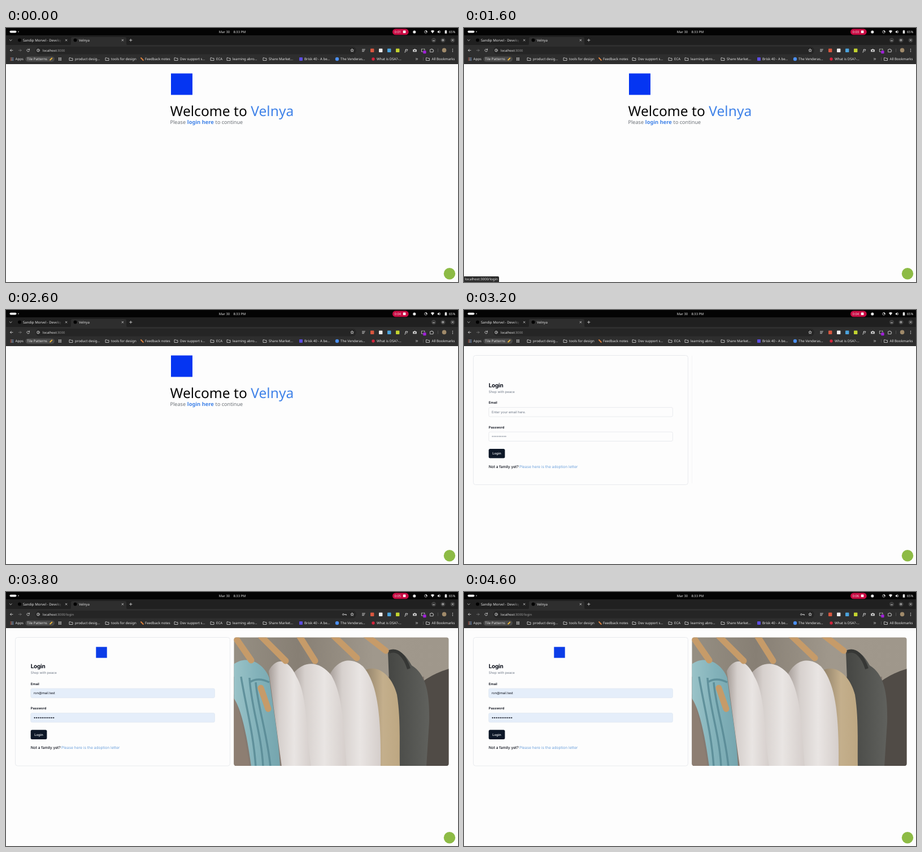
An HTML page that plays this animation: 800x450 px, repeating every 5.5 s.

```html
<!DOCTYPE html>
<html lang="en">
<head>
<meta charset="utf-8">
<title>Login</title>
<style>
  html, body { margin: 0; width: 100%; height: 100%; overflow: hidden; background: #fdfdfd; }
  svg { display: block; width: 100vw; height: 100vh; }
  text { white-space: pre; text-rendering: geometricPrecision; }
  .ui { font: 6.1px "Noto Sans", sans-serif; fill: #e6e6e6; }
  .line { fill: none; stroke: #dcdcdc; stroke-width: .8; stroke-linecap: round; stroke-linejoin: round; }
  .welcome { font: 24.6px "Noto Sans", sans-serif; fill: #050505; }
  .hint { font: 300 9.1px "Noto Sans", sans-serif; fill: #6d7278; }
  .blue { fill: #3f82e8; }
  .form { font: 5.83px Inter, sans-serif; fill: #0b0f1a; }
  .label { font-weight: 600; }
  .grey { fill: #6c7685; }
</style>
</head>
<body>
<svg viewBox="0 0 800 450">
  <defs>
    <linearGradient id="wall">
      <stop offset="0" stop-color="#968f83"/>
      <stop offset=".3" stop-color="#877f74"/>
      <stop offset=".65" stop-color="#a0988c"/>
      <stop offset="1" stop-color="#9f978b"/>
    </linearGradient>
    <linearGradient id="cloth">
      <stop offset="0" stop-color="#a59c97"/>
      <stop offset=".25" stop-color="#d6d0cd"/>
      <stop offset=".6" stop-color="#e9e5e3"/>
      <stop offset="1" stop-color="#d5cecb"/>
    </linearGradient>
    <linearGradient id="beige">
      <stop offset="0" stop-color="#94846c"/>
      <stop offset=".5" stop-color="#c4af8c"/>
      <stop offset="1" stop-color="#bda782"/>
    </linearGradient>
    <linearGradient id="denim">
      <stop offset="0" stop-color="#454643"/>
      <stop offset="1" stop-color="#60615d"/>
    </linearGradient>
    <linearGradient id="teal">
      <stop offset="0" stop-color="#9ac3c8"/>
      <stop offset=".5" stop-color="#83b2ba"/>
      <stop offset="1" stop-color="#75a5ae"/>
    </linearGradient>
    <linearGradient id="fade">
      <stop offset="0" stop-color="#202020" stop-opacity="0"/>
      <stop offset="1" stop-color="#202020"/>
    </linearGradient>
    <clipPath id="frame"><rect x="403.5" y="80.5" width="380" height="227.5" rx="4"/></clipPath>
    <path id="folder" class="line" d="M.4 -2.2h2.1l.8 .9h2.7v3.8h-5.6z"/>
  </defs>

  <rect width="800" height="450" fill="#fdfdfd"/>

  <g id="home">
    <rect x="292" y="80.5" width="38" height="38" fill="#0535f2"/>
    <text class="welcome" x="290.5" y="156">Welcome to <tspan class="blue">Velnya</tspan></text>
    <g class="hint">
      <text x="290.5" y="170.3">Please</text>
      <text x="320.8" y="170.3" class="blue" font-weight="700" font-size="9.3">login here</text>
      <text x="370.6" y="170.3">to continue</text>
    </g>
  </g>

  <g id="login" class="form">
    <rect id="card" x="16.5" y="80.5" width="380" height="227.5" rx="4" fill="none" stroke="#e4e6ea" stroke-width=".8"/>
    <g id="fields">
      <text x="43.7" y="135.2" font-size="10" font-weight="700" letter-spacing="-.25">Login</text>
      <text class="grey" x="43.7" y="145.4">Shop with peace</text>
      <text class="label" x="43.7" y="164.6">Email</text>
      <text class="label" x="43.7" y="208.2">Password</text>
      <g id="boxes" stroke-width=".8">
        <rect x="43.8" y="171" width="325.6" height="16.4" rx="2.4"/>
        <rect x="43.8" y="214.4" width="325.6" height="16.4" rx="2.4"/>
      </g>
      <rect x="43.7" y="244.3" width="28.7" height="16.6" rx="2.5" fill="#0d1727"/>
      <text x="50.3" y="254.7" font-weight="500" fill="#f8fafc">Login</text>
      <text x="43.7" y="278.2" font-size="6.67" font-weight="500">Not a family yet?</text>
      <text x="98" y="278.2" font-size="6.67" fill="#6da1dc">Please here is the adoption letter</text>
      <g id="empty" class="grey">
        <text x="49" y="181.3">Enter your email here.</text>
        <text x="49" y="225.6">*********</text>
      </g>
    </g>
    <line id="edge" x1="403.5" y1="81" x2="403.5" y2="307" stroke="#f1f2f4" stroke-width=".8"/>
    <g id="filled">
      <rect x="159.3" y="97.3" width="19.4" height="19.4" fill="#0c3de8"/>
      <text x="49" y="181.3">ron@mail.test</text>
      <g id="dots"></g>
      <g clip-path="url(#frame)">
        <rect x="403" y="80" width="381" height="229" fill="url(#wall)"/>
        <path d="M403 150H740V309H403z" fill="#857a71"/>
        <path d="M726 168Q750 146 784 136V309H726z" fill="#504b46"/>
        <path d="M676 106C692 98 706 108 718 130 744 146 750 180 749 230L744 309H684z" fill="url(#denim)"/>
        <path d="M678 106C694 100 706 114 713 136" fill="none" stroke="#363735" stroke-width="6"/>
        <path d="M637 138C660 128 684 150 692 182 699 226 696 270 697 309H652z" fill="url(#beige)"/>
        <path d="M572 148C588 116 614 116 632 132 656 160 664 210 663 309H602z" fill="url(#cloth)"/>
        <path d="M504 150C526 118 556 122 576 148 598 186 598 250 603 309H532z" fill="url(#cloth)"/>
        <path d="M465 140C478 114 500 118 514 150 534 184 530 240 540 309H488z" fill="url(#cloth)"/>
        <path d="M403 180Q418 220 431 309H403z" fill="#8d7e72"/>
        <path d="M403 128C424 112 454 122 466 152 472 204 482 250 485 309H434C426 250 416 206 403 188z" fill="url(#teal)"/>
        <g fill="none" stroke="#568893" stroke-width="3.5" opacity=".8">
          <path d="M431 152C434 205 452 250 455 309M442 160C446 205 462 250 468 309M416 150C424 200 438 250 442 309M431 160Q446 150 466 160"/>
        </g>
        <g fill="none" stroke="#c69b69" stroke-width="11" stroke-linecap="round">
          <path d="M407 82L434 121M451 78L495 122M518 76L547 122M578 76L621 117M636 76L672 104"/>
          <path d="M451 170L464 207"/>
        </g>
      </g>
    </g>
  </g>

  <rect width="800" height="13" fill="#040404"/>
  <rect y="13" width="800" height="18" fill="#202020"/>
  <rect y="30" width="800" height="34" fill="#2e2e2e"/>
  <path d="M112 30.5q3 0 3-3v-8.5q0-3 3-3h92q3 0 3 3v8.5q0 3 3 3z" fill="#2e2e2e"/>
  <rect x="52" y="33" width="568" height="13.4" rx="6.7" fill="#252525"/>

  <g class="ui">
    <rect x="6.5" y="4.8" width="12" height="3.6" rx="1.8" fill="#fff"/>
    <circle cx="22" cy="6.6" r="1.1" fill="#8e8e8e"/>
    <text x="376.8" y="8.6" font-size="5.9">Mar 30</text>
    <text x="402.5" y="8.6" font-size="5.8">8:33 PM</text>
    <rect x="684" y="1.6" width="28.7" height="10.6" rx="5.3" fill="#c90b43"/>
    <text id="clock" x="687.6" y="8.8" font-size="5.8"></text>
    <rect x="702.8" y="4.5" width="4.6" height="4.6" rx=".6" fill="#fff"/>
    <circle cx="722.8" cy="7" r="2.6"/>
    <circle cx="743" cy="6.8" r="2.3" class="line"/>
    <path d="M743 4.5v2.3h2.3a2.3 2.3 0 0 0-2.3-2.3z"/>
    <path d="M751.8 5.2q3.2-2.4 6.4 0L755 9.6z"/>
    <path d="M763.8 5.7h1.3l1.8-1.7v5.6l-1.8-1.7h-1.3z"/>
    <path class="line" d="M768.2 5q1.3 1.8 0 3.6"/>
    <path d="M776.7 4.4h1v-.7h1.6v.7h1v5.4h-3.6z"/>
    <text x="783.8" y="8.6" font-size="5.8">65%</text>

    <path class="line" d="M6.4 20.8l1.9 1.9 1.9-1.9"/>
    <circle cx="24" cy="21.6" r="3" fill="#000"/>
    <text x="30" y="23.7">Sandip Morvel - Develop</text>
    <rect x="86" y="16" width="14" height="12" fill="url(#fade)"/>
    <rect x="97" y="16" width="6" height="12" fill="#202020"/>
    <circle cx="122.5" cy="21.6" r="3" fill="#000"/>
    <text x="129" y="23.7">Velnya</text>
    <path class="line" d="M105.2 20.2l2.8 2.8m0-2.8l-2.8 2.8M205 20.2l2.8 2.8m0-2.8l-2.8 2.8M218.6 21.6h4.4m-2.2-2.2v4.4"/>
    <g fill="#3c3c3c"><circle cx="757" cy="21.6" r="4.2"/><circle cx="773.5" cy="21.6" r="4.2"/><circle cx="790.5" cy="21.6" r="4.2"/></g>
    <path class="line" d="M755.5 22.6h3M789.2 20.3l2.6 2.6m0-2.6l-2.6 2.6M772.4 20.5h2.2v2.2h-2.2z"/>

    <path class="line" d="M12 39.6h-4.6m2-2l-2 2 2 2"/>
    <path class="line" stroke-opacity=".4" d="M22.4 39.6h4.6m-2-2l2 2-2 2"/>
    <path class="line" d="M41.2 38.4a2.3 2.3 0 1 0 .2 2M41.5 37v1.7h-1.7"/>
    <circle class="line" cx="57" cy="39.6" r="2.4"/>
    <path class="line" d="M57 39.5v1.2m0-2.4v.05"/>
    <text x="65" y="41.8" font-size="5.8">localhost<tspan fill="#9a9a9a">:3000<tspan id="path">/login</tspan></tspan></text>
    <path id="key" class="line" d="M596.8 38.4a1.4 1.4 0 1 0 .01 0M598.3 39.8h4.2v1.3m-1.6-1.3v1"/>
    <path class="line" d="M612.6 37l.8 1.7 1.9.2-1.4 1.3.4 1.9-1.7-.9-1.7.9.4-1.9-1.4-1.3 1.9-.2z"/>
    <path class="line" d="M630.5 37.8h5M630.5 39.7h4M630.5 41.6h3"/>
    <g id="tools"></g>
    <text x="706" y="42" font-style="italic" font-weight="700">f?</text>
    <path d="M720.2 38h1.7l.8-1h1.6l.8 1h1.7v4.2h-6.6z" fill="#cfcfcf"/>
    <circle cx="723.5" cy="40" r="1.2" fill="#444"/>
    <path class="line" d="M737.4 37.2h-2v4.8h2m1.6-4.8h2v2"/>
    <rect x="738.2" y="40" width="5.4" height="5.2" rx="1" fill="#a021d8"/>
    <path class="line" d="M751 38h1.7v-.8h1.5v.8h1.8v1.7h.7v1.4h-.7v1.5h-5z"/>
    <rect x="764.3" y="36.5" width=".6" height="6" fill="#666"/>
    <circle cx="775.6" cy="39.4" r="3.8" fill="#a08a6a"/>
    <g><circle cx="790.5" cy="37.4" r=".7"/><circle cx="790.5" cy="39.6" r=".7"/><circle cx="790.5" cy="41.8" r=".7"/></g>

    <rect x="34.5" y="50.5" width="51.5" height="9.2" rx="4.6" fill="#4a4a4a"/>
    <g id="marks"></g>
    <path d="M77.6 57.2l4.2-4.2" stroke="#f0b93a" stroke-width="1.8"/>
    <path d="M239 53l3.8 4" stroke="#d9803c" stroke-width="2" stroke-linecap="round"/>
    <path class="line" d="M725.4 53.6l1.4 1.4-1.4 1.4m2-2.8l1.4 1.4-1.4 1.4"/>
    <rect x="738" y="52" width=".6" height="6" fill="#666"/>
  </g>

  <circle cx="785" cy="435.3" r="10.2" fill="#8dbb45"/>

  <g id="status" class="ui">
    <path d="M0 440h60q2 0 2 2v8H0z" fill="#2b2b2b"/>
    <text x="1.8" y="447.2">localhost:3000/login</text>
  </g>
</svg>

<script>
const $ = id => document.getElementById(id);
const show = (id, on) => $(id).style.display = on ? "" : "none";
const square = (x, y, size, fill) =>
  `<rect x="${x}" y="${y}" width="${size}" height="${size}" rx=".8" fill="${fill}"/>`;

// Bookmarks: text position, label, and whether a folder precedes it
const marks = [
  [16.5, "Apps"], [37.3, "Tile Patterns"], [122, "product desig…", 1],
  [186, "tools for design", 1], [246, "Feedback notes"], [308, "Dev support s…", 1],
  [372, "ECA", 1], [401, "learning abro…", 1], [465, "Share Market…", 1],
  [528, "Brisk 40 - A be…"], [592, "The Venderas…"], [656, "What is DSA?-…"],
  [753.5, "All Bookmarks", 1]
];
$("marks").innerHTML = marks.map(([x, label, folder]) =>
  (folder ? `<use href="#folder" x="${x - 10}" y="55"/>` : "") +
  `<text x="${x}" y="57.1">${label}</text>`).join("") +
  [0, 1, 2, 3, 4, 5, 6, 7, 8].map(i =>
    square(7.5 + i % 3 * 2.2, 52.2 + (i / 3 | 0) * 2.2, 1.5, ["#e06a5a", "#d8d8d8", "#7fa7e8"][i % 3])).join("") +
  [0, 1, 2, 3].map(i => square(92.8 + i % 2 * 3, 52.4 + (i >> 1) * 3, 2.2, "#ddd")).join("") +
  square(519, 52, 6, "#5b4ce0") +
  `<circle cx="586" cy="55" r="3.2" fill="#4b8ff0"/><circle cx="650" cy="55" r="2.7" fill="#d3243c"/>`;

$("tools").innerHTML = ["#d9573f", "#ececec", "#4ba3dc", "#c4d42f"]
  .map((fill, i) => square(645 + i * 15, 36.6, 6.4, fill)).join("");

$("dots").innerHTML = Array.from({ length: 11 }, (_, i) =>
  `<circle cx="${50.6 + i * 3.36}" cy="222.8" r="1.1"/>`).join("");

function draw(now) {
  const t = now % 5500, step = Math.floor(t / 100);
  const login = t >= 3200, url = t >= 3600, filled = t >= 3800;

  $("clock").textContent = "0:0" + Math.floor((t + 1400) / 1000);
  $("status").style.opacity = Math.max(0, Math.min(1, (step - 5) / 2, (24 - step) / 3));

  show("home", !login);
  show("login", login);
  show("path", url);
  show("key", url);

  show("empty", !filled);
  show("edge", !filled);
  show("filled", filled);
  $("card").setAttribute("height", filled ? 227.5 : 229);
  $("fields").setAttribute("transform", `translate(0 ${filled ? 0 : 1.6})`);
  $("boxes").setAttribute("fill", filled ? "#e5eefa" : "#fdfdfd");
  $("boxes").setAttribute("stroke", filled ? "#dfe7f1" : "#e4e6ea");
  requestAnimationFrame(draw);
}
draw(performance.now());
</script>
</body>
</html>
```
